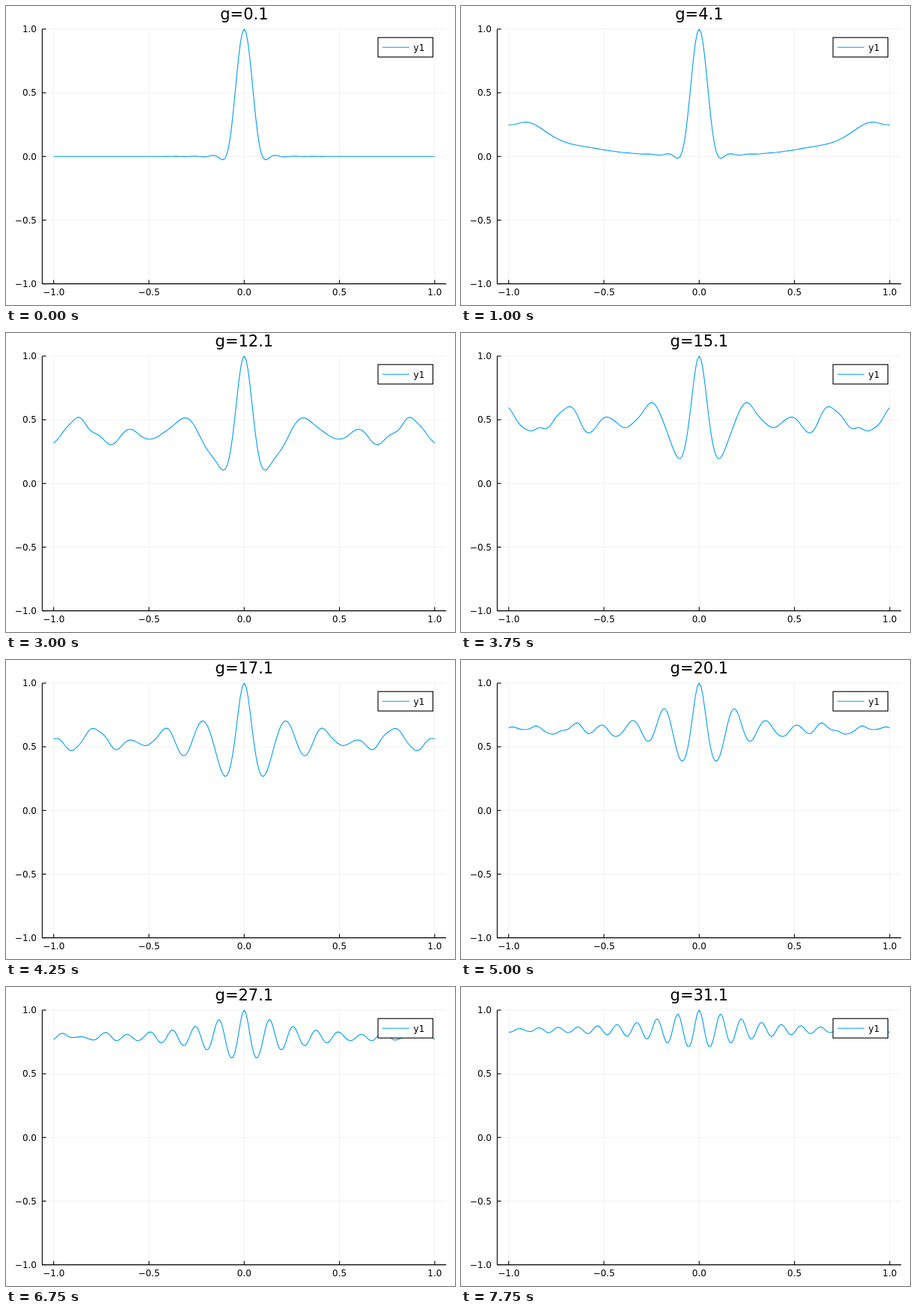
Write an HTML page that moves like this. It is 600 by 400 pixels and loops after 8000 ms.

```html
<!DOCTYPE html>
<html lang="en">
<head>
<meta charset="utf-8">
<title>Ensemble average</title>
<style>
html, body { margin: 0; width: 100%; height: 100%; overflow: hidden; background: #fff; }
svg { display: block; width: 600px; height: 400px; }
text { font: 12px "DejaVu Sans", sans-serif; fill: #000; }
#title { font-size: 21px; text-anchor: middle; }
</style>
</head>
<body>
<svg viewBox="0 0 600 400">
  <g id="grid" stroke="#000" stroke-opacity=".1" stroke-width=".6"></g>
  <g id="axes" stroke="#000" stroke-width="1.1"></g>
  <g id="labels"></g>
  <polyline id="curve" fill="none" stroke="#009af9" stroke-width="1.1" stroke-linejoin="round"/>
  <rect x="497.1" y="42.2" width="73.4" height="26" fill="#fff" stroke="#000" stroke-width="1.1"/>
  <path d="M503 55.2H539" stroke="#009af9" stroke-width="1.1"/>
  <text x="544.6" y="59.5">y1</text>
  <text id="title" x="318.4" y="18"></text>
</svg>
<script>
const STEP = 250, COUNT = 32, N = 100, MODES = 21, SUB = 4;
const LEFT = 48.4, RIGHT = 588.2, TOP = 30.9, BOTTOM = 371.6;
const NS = "http://www.w3.org/2000/svg";
const byId = id => document.getElementById(id);
const px = x => 318.3 + 254.6 * x;
const py = y => 201.25 - 170.35 * y;

function add(parent, tag, attrs, text) {
  const el = document.createElementNS(NS, tag);
  for (const k in attrs) el.setAttribute(k, attrs[k]);
  if (text) el.textContent = text;
  byId(parent).appendChild(el);
}
const line = (parent, x1, y1, x2, y2) => add(parent, "line", { x1, y1, x2, y2 });

function drawAxes() {
  line("axes", LEFT, TOP, LEFT, BOTTOM + .5);
  line("axes", LEFT, BOTTOM, RIGHT, BOTTOM);
  for (let v = -1; v <= 1; v += .5) {
    const label = v.toFixed(1).replace("-", "\u2212");
    const x = px(v), y = py(v);
    line("grid", x, TOP, x, BOTTOM);
    line("grid", LEFT, y, RIGHT, y);
    line("axes", x, BOTTOM, x, BOTTOM - 5.2);
    line("axes", LEFT, y, LEFT + 5.2, y);
    add("labels", "text", { x, y: 387.3, "text-anchor": "middle" }, label);
    add("labels", "text", { x: 41, y: y + 4.4, "text-anchor": "end" }, label);
  }
}

// Mean of cos(angle) over pendulums with Hann-weighted starting speeds.
function meanCos(g) {
  const sum = new Array(N + 1).fill(0), h = 1 / (N * SUB);
  const acc = a => -g * g * Math.sin(a);
  let total = 0;
  for (let n = 0; n < MODES; n++) {
    const w = (n ? 2 : 1) * (1 + Math.cos(Math.PI * n / MODES));
    let a = 0, v = Math.PI * n;
    total += w;
    for (let i = 0; i <= N; i++) {
      sum[i] += w * Math.cos(a);
      for (let s = 0; s < SUB; s++) {
        const k1 = acc(a);
        const v2 = v + h / 2 * k1, k2 = acc(a + h / 2 * v);
        const v3 = v + h / 2 * k2, k3 = acc(a + h / 2 * v2);
        const v4 = v + h * k3, k4 = acc(a + h * v3);
        a += h / 6 * (v + 2 * v2 + 2 * v3 + v4);
        v += h / 6 * (k1 + 2 * k2 + 2 * k3 + k4);
      }
    }
  }
  return sum.map(s => s / total);
}

function curvePoints(g) {
  const ys = meanCos(g), pts = [];
  for (let i = -N; i <= N; i++)
    pts.push(px(i / N).toFixed(2) + "," + py(ys[Math.abs(i)]).toFixed(2));
  return pts.join(" ");
}

const curves = Array.from({ length: COUNT }, (_, i) => curvePoints(i + .1));
let shown = -1;

function render(now) {
  const i = Math.floor(now / STEP) % COUNT;
  if (i !== shown) {
    shown = i;
    byId("curve").setAttribute("points", curves[i]);
    byId("title").textContent = "g=" + (i + .1).toFixed(1);
  }
}

drawAxes();
render(0);
let start;
requestAnimationFrame(function tick(now) {
  start ??= now;
  render(now - start);
  requestAnimationFrame(tick);
});
</script>
</body>
</html>
```
